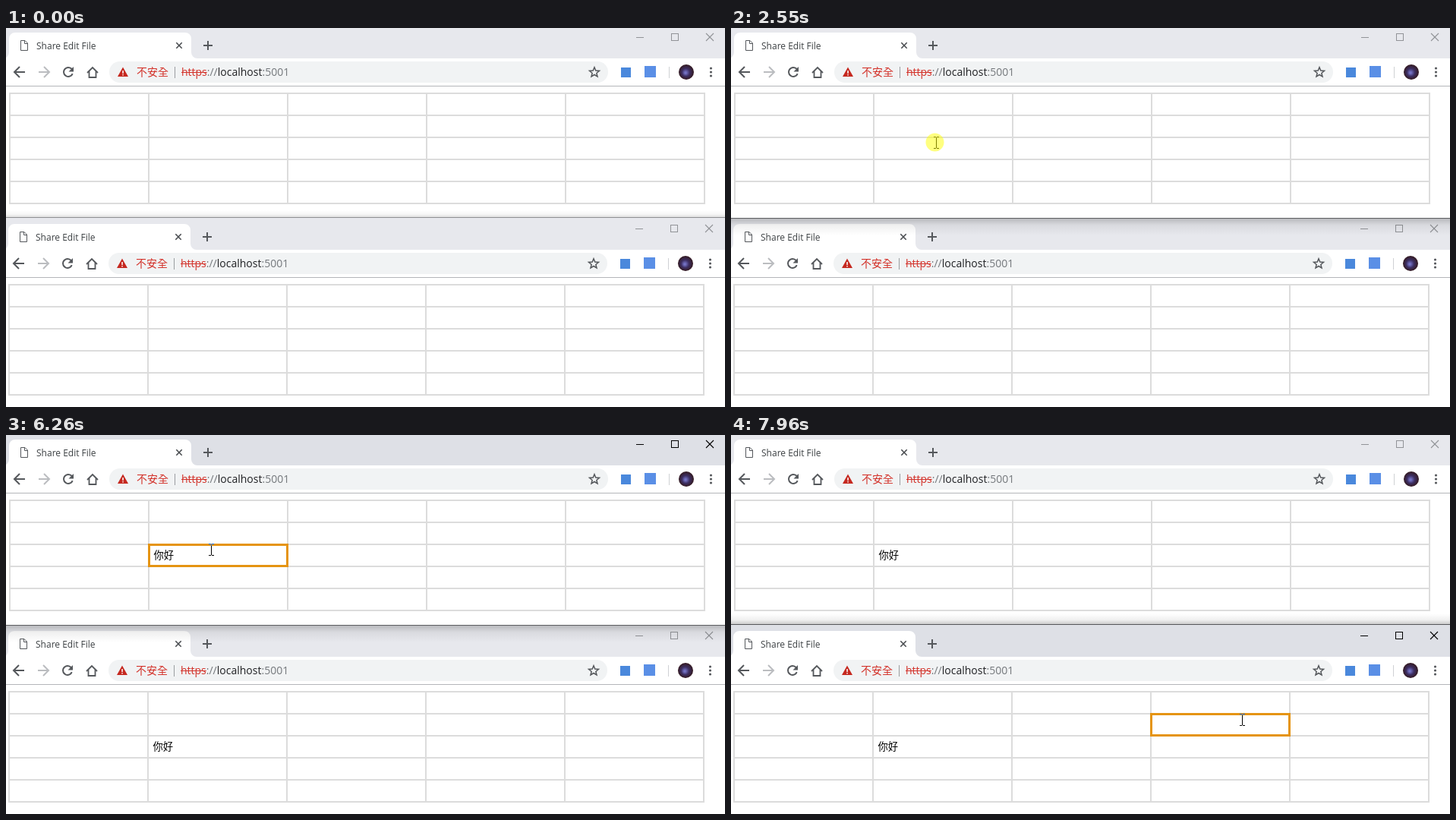
Write an HTML page with a canvas that moves like this. It is 947 px wide and 499 px high and loops after 8 s.

```html
<!DOCTYPE html>
<html lang="zh-Hant">
<head>
<meta charset="utf-8">
<title>Share Edit File</title>
<style>
  html, body { margin: 0; width: 100%; height: 100%; overflow: hidden; background: #fff; }
  canvas { display: block; }
</style>
</head>
<body>
<canvas id="stage" width="947" height="499"></canvas>
<script>
const ctx = document.getElementById('stage').getContext('2d');
const LOOP = 8000;
const LATIN = '"Open Sans", "Noto Sans", sans-serif';
const HAN = '"Noto Sans CJK TC", "Noto Sans CJK JP", "Noto Sans CJK", sans-serif';
const ICON = '#55585c', RED = '#d3322a';
const COL = 183, ROW = 29;
const WINDOWS = [[0, 0], [-1, 252]];

function rect(x, y, w, h, color) {
  ctx.fillStyle = color;
  ctx.fillRect(x, y, w, h);
}

function trace(points) {
  ctx.beginPath();
  points.forEach(([x, y], i) => i ? ctx.lineTo(x, y) : ctx.moveTo(x, y));
}

function line(points, color, width = 1, close = false) {
  trace(points);
  if (close) ctx.closePath();
  ctx.strokeStyle = color;
  ctx.lineWidth = width;
  ctx.stroke();
}

function shape(points, color) {
  trace(points);
  ctx.fillStyle = color;
  ctx.fill();
}

function disc(x, y, r, color) {
  ctx.beginPath();
  ctx.arc(x, y, r, 0, Math.PI * 2);
  ctx.fillStyle = color;
  ctx.fill();
}

// Returns the x position after the text.
function label(text, x, y, font, color) {
  ctx.font = font;
  ctx.fillStyle = color;
  ctx.fillText(text, x, y);
  return x + ctx.measureText(text).width;
}

function cross(x, y, r, color, width) {
  line([[x - r, y - r], [x + r, y + r]], color, width);
  line([[x + r, y - r], [x - r, y + r]], color, width);
}

function drawTab() {
  ctx.beginPath();
  ctx.moveTo(-4, 40);
  ctx.arcTo(4, 40, 4, 32, 8);
  ctx.arcTo(4, 6, 12, 6, 8);
  ctx.arcTo(244, 6, 244, 14, 8);
  ctx.arcTo(244, 40, 252, 40, 8);
  ctx.lineTo(252, 40);
  ctx.fillStyle = '#fff';
  ctx.fill();
  line([[19.5, 16.5], [25, 16.5], [28.5, 20], [28.5, 29.5], [19.5, 29.5]], ICON, 1, true);
  line([[24.5, 16.5], [24.5, 20.5], [28.5, 20.5]], ICON);
  label('Share Edit File', 40, 28, '12px ' + LATIN, '#3c4043');
  cross(228, 23, 3.7, '#4a4d51', 1.6);
  rect(260, 22, 12, 2, ICON);
  rect(265, 17, 2, 12, ICON);
}

function drawControls(color) {
  rect(830, 12, 10, 1, color);
  ctx.strokeStyle = color;
  ctx.lineWidth = 1;
  ctx.strokeRect(876.5, 7.5, 9, 9);
  cross(927, 12, 5, color, 1.1);
}

function arrowIcon(x, dir, color) {
  line([[x - 7 * dir, 58], [x + 7 * dir, 58]], color, 2);
  line([[x, 51], [x - 7 * dir, 58], [x, 65]], color, 2);
}

function drawNavigation() {
  arrowIcon(18, 1, ICON);
  arrowIcon(50, -1, '#bbbdc0');
  ctx.beginPath();
  ctx.arc(82, 58, 6, 0.35, Math.PI * 1.78);
  ctx.strokeStyle = ICON;
  ctx.lineWidth = 2;
  ctx.stroke();
  shape([[89, 51], [89, 57.5], [82.5, 57.5]], ICON);
  line([[107, 59], [114, 52], [121, 59]], ICON, 1.8);
  line([[109.5, 57], [109.5, 65], [118.5, 65], [118.5, 57]], ICON, 1.8);
}

function drawAddress() {
  ctx.beginPath();
  ctx.roundRect(136, 44, 657, 28, 14);
  ctx.fillStyle = '#f1f3f4';
  ctx.fill();
  shape([[147, 64], [154, 51.5], [161, 64]], '#c5281f');
  rect(153.3, 56, 1.5, 4, '#fff');
  rect(153.3, 61, 1.5, 1.5, '#fff');
  label('不安全', 172, 63, '14px ' + HAN, RED);
  rect(222, 51, 1, 15, '#9a9da1');
  const font = '14px ' + LATIN;
  let x = label('https', 231, 63, font, RED);
  rect(231, 58, x - 231, 1, RED);
  x = label('://', x, 63, font, '#74787c');
  x = label('localhost', x, 63, font, '#202124');
  label(':5001', x, 63, font, '#74787c');

  const star = Array.from({ length: 10 }, (_, i) => {
    const a = i * Math.PI / 5 - Math.PI / 2, r = i % 2 ? 3 : 6.8;
    return [775 + r * Math.cos(a), 58.5 + r * Math.sin(a)];
  });
  line(star, ICON, 1.5, true);
}

function drawExtras() {
  rect(810, 52, 13, 13, '#4a88dc');
  rect(841, 50, 15, 15, '#5a8fe6');
  rect(873, 51, 1, 15, '#cfd1d4');
  const glow = ctx.createRadialGradient(895, 59, 1, 896, 58, 10);
  glow.addColorStop(0, '#7472c4');
  glow.addColorStop(0.45, '#3d2f63');
  glow.addColorStop(1, '#33191f');
  disc(896, 58, 10, glow);
  for (const y of [53, 58, 63]) disc(928.5, y, 1.6, ICON);
}

function drawTable() {
  for (let i = 0; i <= 5; i++) {
    rect(4 + i * COL, 85, 2, 5 * ROW + 2, '#dcdcdc');
    rect(4, 85 + i * ROW, 5 * COL + 2, 2, '#dcdcdc');
  }
}

function drawFocus(col, row) {
  ctx.strokeStyle = '#e59412';
  ctx.lineWidth = 3;
  rect(4 + col * COL, 85 + row * ROW, 185, 31, '#fff');
  ctx.strokeRect(5.5 + col * COL, 86.5 + row * ROW, 182, 28);
}

// The bopomofo syllable still being composed: a bar stacked over a hook.
function drawSyllable() {
  line([[197, 155.5], [206, 155.5]], '#000');
  line([[199, 158.5], [204, 158.5], [201, 160.5], [204.5, 160.5], [204, 163.5], [202, 163.5]], '#000');
}

function drawEntry(entry) {
  if (entry.text === 'stack') drawSyllable();
  else label(entry.text, 194.5, 163 + entry.dy, '13.33px ' + HAN, '#000');
}

const ENTRIES = [
  { at: 2640, text: '', dy: 1, caret: 195 },
  { at: 3290, text: 'ㄋ', dy: 1, caret: 208, composing: true },
  { at: 3570, text: 'stack', dy: 1, caret: 208, composing: true },
  { at: 4260, text: '你', dy: 1, caret: 208, composing: true },
  { at: 4900, text: '你ㄏ', dy: 1, caret: 222, composing: true },
  { at: 5180, text: '你ㄏㄠ', dy: 1, caret: 235, composing: true },
  { at: 5330, text: '你好', dy: 1, caret: 222, composing: true },
  { at: 5460, text: '你好', dy: 0, caret: 222 }
];
const entryAt = t => ENTRIES.filter(e => e.at <= t).pop();

function drawWindow(index, t, active) {
  ctx.save();
  ctx.translate(...WINDOWS[index]);
  rect(0, -2, 948, 42, active ? '#dee0e6' : '#e7e8ed');
  rect(0, 40, 948, 260, '#fff');
  drawTab();
  drawControls(active ? '#000' : '#919397');
  drawNavigation();
  drawAddress();
  drawExtras();
  rect(0, 76, 948, 1, '#b4b6b9');
  drawTable();

  if (index === 0 && active) drawFocus(1, 2);
  if (index === 1 && active) drawFocus(3, 1);
  const entry = entryAt(index ? t - 50 * (t < 3500) : t);
  if (entry) drawEntry(entry);
  if (index === 0 && active && entry) {
    if (entry.composing) rect(195, 166, entry.caret - 195, 1, '#000');
    const since = t - Math.max(entry.at, 2730);
    const on = since < 0 || Math.floor(since / 510) % 2 === 0;
    if (on && t < 6990) rect(entry.caret, 150 + entry.dy, 1, 15, '#000');
  }
  if (index === 1 && active && t >= 7400 && t < 7960) rect(561, 122, 1, 15, '#000');
  ctx.restore();
}

function shade(y0, y1, alpha) {
  const g = ctx.createLinearGradient(0, y0, 0, y1);
  g.addColorStop(0, `rgba(0,0,0,${alpha})`);
  g.addColorStop(0.4, `rgba(0,0,0,${alpha * 0.3})`);
  g.addColorStop(1, 'rgba(0,0,0,0)');
  rect(0, Math.min(y0, y1), 947, Math.abs(y1 - y0), g);
}

function drawSeam(upperInFront, lowerActive) {
  if (upperInFront) {
    shade(251, 273, 0.2);
    rect(0, 250, 947, 1, '#5c5d60');
  } else {
    shade(249, lowerActive ? 235 : 240, lowerActive ? 0.2 : 0.13);
    rect(0, 249, 947, 1, lowerActive ? '#55565a' : '#8e8f92');
  }
}

const PATH = [
  [1120, 818, 478], [1910, 280, 147], [1990, 270, 151],
  [6220, 270, 151], [6710, 582, 434], [7040, 668, 401], [7140, 673, 375]
];

function pointerAt(t) {
  if (t < PATH[0][0]) return null;
  const tick = 46.5;
  const next = PATH.findIndex(p => p[0] > t);
  if (next < 0) return PATH[PATH.length - 1].slice(1);
  const [t0, x0, y0] = PATH[next - 1], [t1, x1, y1] = PATH[next];
  const u = Math.floor((t - t0) / tick + 0.01) * tick / (t1 - t0);
  const k = (1 - Math.cos(Math.PI * u)) / 2;
  return [Math.round(x0 + (x1 - x0) * k), Math.round(y0 + (y1 - y0) * k)];
}

function drawPointer(x, y) {
  const overTable = WINDOWS.some(([dx, dy]) =>
    x >= 4 + dx && x < 921 + dx && y >= 85 + dy && y < 232 + dy);
  if (overTable) {
    ctx.globalCompositeOperation = 'difference';
    rect(x, y - 7, 1, 14, '#fff');
    for (const top of [y - 8, y + 7]) {
      rect(x - 3, top, 3, 1, '#fff');
      rect(x + 1, top, 3, 1, '#fff');
    }
    ctx.globalCompositeOperation = 'source-over';
    return;
  }
  const arrow = [[0, 0], [0, 16], [4, 12.5], [6.5, 18], [9, 17], [6.5, 11.5], [11.5, 11.5]]
    .map(([ax, ay]) => [x + ax + 0.5, y + ay + 0.5]);
  shape(arrow, '#fff');
  line(arrow, '#000', 1, true);
}

function draw(t) {
  const upperActive = t >= 2640 && t < 7370;
  const lowerActive = t >= 7370;
  drawWindow(0, t, upperActive);
  drawWindow(1, t, lowerActive);
  drawSeam(t >= 2550 && t < 7280, lowerActive);
  const pointer = pointerAt(t);
  if (!pointer) return;
  drawPointer(...pointer);
  const pressed = (t >= 2550 && t < 2730) || (t >= 7280 && t < 7400);
  if (pressed) disc(pointer[0] - 1.5, pointer[1] - 0.5, 12, 'rgba(255,255,0,.5)');
}

const start = performance.now();
function frame() {
  draw((performance.now() - start) % LOOP);
  requestAnimationFrame(frame);
}
frame();
</script>
</body>
</html>
```
